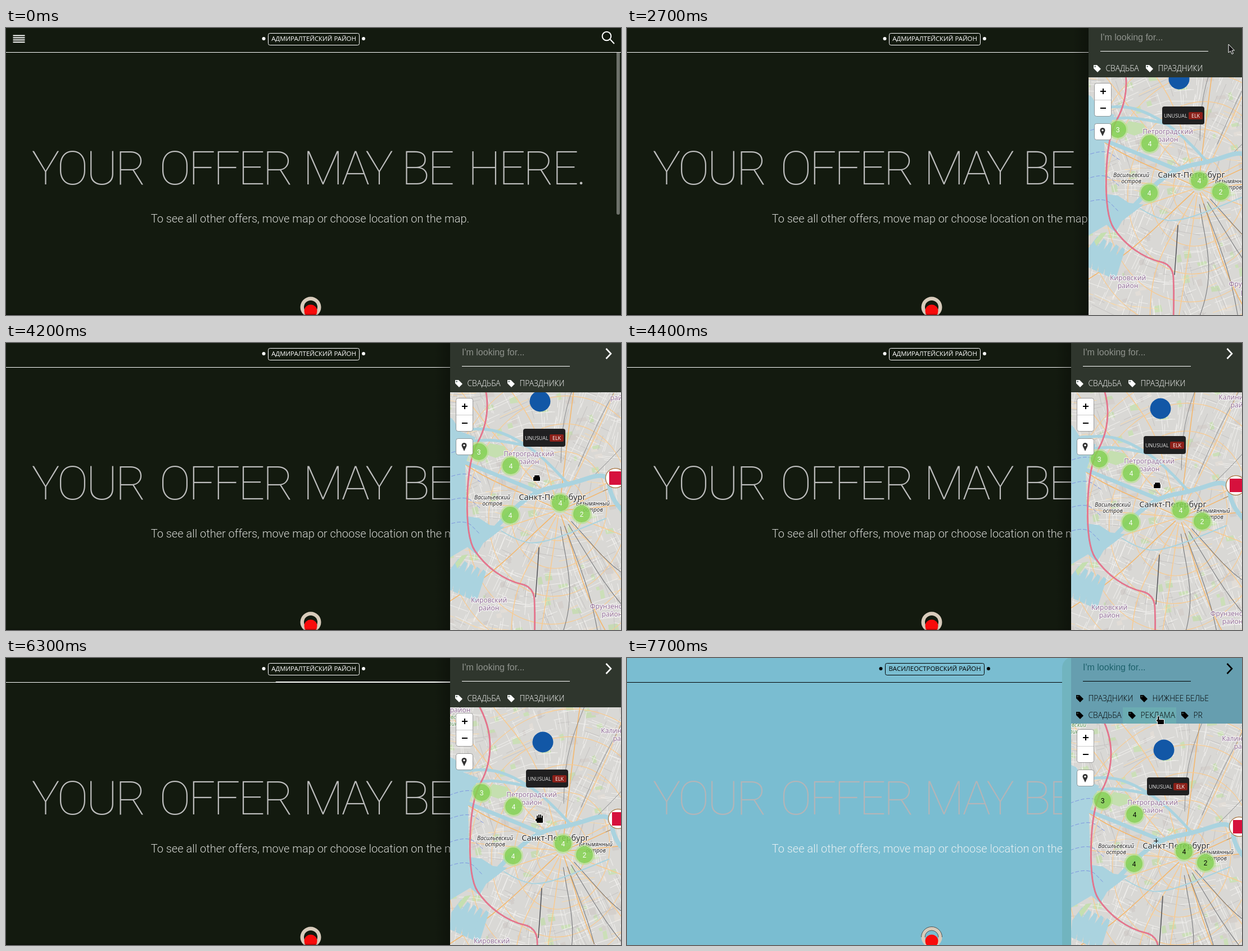
Write an HTML page with a canvas that moves like this. It is 1094x512 px and loops after 8 s.

```html
<!DOCTYPE html>
<html lang="en">
<head>
<meta charset="utf-8">
<title>Offer map</title>
<style>
html, body { margin: 0; width: 100%; height: 100%; overflow: hidden; background: #131a0f; }
canvas { display: block; width: 1094px; height: 512px; }
</style>
</head>
<body>
<canvas id="stage" width="1094" height="512"></canvas>
<script>
const LOOP = 8000, STEP = 100, W = 1094, H = 512;
const RELAYOUT = 6400;   // district name and tag rows change here
const g = document.getElementById('stage').getContext('2d');
const SANS = '"Open Sans", sans-serif', ARIAL = '"Liberation Sans", Arial, sans-serif';
const NOTO = '"Noto Sans", sans-serif', THIN = 'Roboto, sans-serif';

const clamp = v => Math.max(0, Math.min(1, v));
const progress = (t, from, to) => clamp((t - from) / (to - from));
const mix = (a, b, k) => `rgb(${a.map((v, i) => Math.round(v + (b[i] - v) * k))})`;

// Linear keyframes: each key is [time, x, y].
function track(keys, t) {
  const next = keys.findIndex(k => k[0] >= t);
  if (next === 0) return keys[0].slice(1);
  if (next < 0) return keys[keys.length - 1].slice(1);
  const a = keys[next - 1], b = keys[next], k = progress(t, a[0], b[0]);
  return [1, 2].map(i => a[i] + (b[i] - a[i]) * k);
}

function seeded(seed) {
  return () => (seed = (seed * 16807) % 2147483647) / 2147483647;
}

function text(c, str, x, y, font, color, align = 'left') {
  c.font = font;
  c.fillStyle = color;
  c.textAlign = align;
  c.fillText(str, x, y);
}

function disc(c, x, y, r, color) {
  c.fillStyle = color;
  c.beginPath();
  c.arc(x, y, r, 0, 7);
  c.fill();
}

function box(c, x, y, w, h, r, fill, stroke) {
  c.beginPath();
  c.roundRect(x, y, w, h, r);
  if (fill) { c.fillStyle = fill; c.fill(); }
  if (stroke) { c.strokeStyle = stroke; c.lineWidth = 1; c.stroke(); }
}

function curve(c, p) {
  c.beginPath();
  c.moveTo(p[0], p[1]);
  for (let i = 2; i < p.length - 2; i += 2)
    c.quadraticCurveTo(p[i], p[i + 1], (p[i] + p[i + 2]) / 2, (p[i + 1] + p[i + 3]) / 2);
  c.lineTo(p[p.length - 2], p[p.length - 1]);
}

function line(c, p, color, width, dash = []) {
  curve(c, p);
  c.strokeStyle = color;
  c.lineWidth = width;
  c.setLineDash(dash);
  c.stroke();
  c.setLineDash([]);
}

function area(c, p, color) {
  c.beginPath();
  for (let i = 0; i < p.length; i += 2) c.lineTo(p[i], p[i + 1]);
  c.closePath();
  c.fillStyle = color;
  c.fill();
}

// ---- city map, drawn once in stage coordinates ----
const MAP = { x: 770, y: 10, w: 350, h: 520 }, CENTER = { x: 985, y: 285 };

function drawLand(c, rnd) {
  const place = () => [MAP.x + rnd() * MAP.w, MAP.y + rnd() * MAP.h];
  c.fillStyle = '#d9d8d5';
  c.fillRect(MAP.x, MAP.y, MAP.w, MAP.h);
  const tints = ['#cbdfb8', '#d2cecb', '#e2ddd7', '#c8dbb5', '#d5d0cc'];
  for (let i = 0; i < 170; i++) {
    const [x, y] = place(), w = 3 + rnd() * 14, h = 3 + rnd() * 9;
    area(c, [x, y, x + w, y - 3, x + w + 3, y + h, x + 2, y + h + 2], tints[i % tints.length]);
  }
  // The street bearing drifts slowly across the city.
  for (let i = 0; i < 750; i++) {
    const [x, y] = place(), len = 5 + rnd() * 20;
    const a = 0.45 * Math.sin(x / 55 + y / 90) + (i % 2) * Math.PI / 2;
    const dx = Math.cos(a) * len, dy = Math.sin(a) * len;
    const color = i % 12 === 0 ? '#fbd7a3' : i % 5 ? '#f3f2f0' : '#c2c0bf';
    line(c, [x - dx, y - dy, x + dx, y + dy], color, 0.9);
  }
}

// A road leaving the centre at an angle, bending gently on its way out.
function radial(c, angle, from, to, bend, color, width) {
  const p = [];
  for (let r = from; r <= to; r += 40) {
    const a = angle + bend * Math.sin(r / 70);
    p.push(CENTER.x + r * Math.cos(a), CENTER.y + r * Math.sin(a));
  }
  line(c, p, color, width);
}

function drawRoads(c, rnd) {
  for (let i = 0; i < 16; i++)
    radial(c, i * Math.PI / 8 + rnd() * 0.15, 10, 330, rnd() * 0.3 - 0.15, i % 3 ? '#f8ca90' : '#f5b669', 1.5);
  for (let r = 55; r < 260; r += 50) {
    c.beginPath();
    c.ellipse(CENTER.x, CENTER.y, r * 0.8, r, 0.2, 0, 7);
    c.strokeStyle = '#f8ca90';
    c.lineWidth = 1.2;
    c.stroke();
  }
  for (let i = 0; i < 4; i++) {
    radial(c, 0.7 + i * 0.28, 30, 350, 0.12 - i * 0.08, '#77787b', 1.1);
    radial(c, -0.5 - i * 0.32, 85, 350, 0.1 - i * 0.06, '#87888a', 1);
  }
  line(c, [949, 352, 946, 400, 943, 440], '#55565a', 1.6);
}

function drawWater(c) {
  const water = '#aad3df';
  area(c, [770, 110, 795, 122, 810, 145, 836, 155, 818, 203, 820, 296, 842, 299, 862, 312,
    888, 315, 850, 344, 838, 365, 822, 351, 770, 382], water);
  for (let i = 0; i < 5; i++) {
    const x = 788 + i * 11, y = 395 + i * 5;
    area(c, [x, y, x + 18, y - 24, x + 23, y - 20, x + 6, y + 34, x - 3, y + 30], water);
  }
  const neva = [864, 326, 884, 301, 943, 250, 1005, 239, 1072, 216, 1076, 262, 1110, 300];
  const littleNeva = [946, 252, 895, 231, 815, 199];
  const nevka = [1000, 238, 982, 217, 934, 172, 868, 139, 810, 142];
  const middleNevka = [932, 172, 877, 159, 825, 162];
  const canal = [882, 322, 915, 343, 960, 344, 1068, 300];
  [[neva, 8], [littleNeva, 7], [nevka, 5], [middleNevka, 5], [canal, 2]]
    .forEach(([p, width]) => line(c, p, water, width));
  for (let i = 0; i < 4; i++) {
    const y = 180 + i * 42;
    line(c, [775, y + 10, 815, y - 8, 845, y + 8 + i * 5], '#7d94df', 1, [6, 4]);
  }
}

function drawLabels(c) {
  function label(str, x, y, font, color, gap = 0) {
    str.split(' ').forEach((row, i) => {
      c.font = font;
      c.textAlign = 'center';
      c.strokeStyle = 'rgba(255,255,255,.7)';
      c.lineWidth = 2.5;
      c.strokeText(row, x, y + i * gap);
      text(c, row, x, y + i * gap, font, color, 'center');
    });
  }
  const district = (name, x, y) => label(name + ' район', x, y, '12px ' + NOTO, '#94719a', 14);
  const island = (name, x, y) => label(name + ' остров', x, y, 'italic 10px ' + NOTO, '#222', 11);
  district('Петроградский', 931, 189);
  district('Кировский', 860, 450);
  district('Фрунзенский', 1079, 461);
  district('Калининский', 1094, 75);
  district('Приморский', 804, 24);
  island('Васильевский', 866, 266);
  island('Безымянный', 1045, 277);
  label('Невский лики', 794, 50, 'italic 10px ' + NOTO, '#5b9254', 12);
  label('Санкт-Петербург', 973, 267, '14.5px ' + NOTO, '#2b2b2b');
}

function drawMap() {
  const canvas = document.createElement('canvas');
  canvas.width = MAP.w;
  canvas.height = MAP.h;
  const c = canvas.getContext('2d'), rnd = seeded(4711);
  c.translate(-MAP.x, -MAP.y);
  c.lineJoin = c.lineCap = 'round';
  drawLand(c, rnd);
  drawRoads(c, rnd);
  drawWater(c);
  area(c, [846, 183, 862, 166, 888, 171, 893, 184, 872, 192], '#c5dfb0');
  area(c, [800, 380, 812, 366, 823, 364, 804, 389], '#c5dfb0');
  const motorway = [834, 20, 857, 60, 857, 134, 823, 195, 820, 335, 850, 380, 895, 412, 940, 422, 942, 470, 941, 520];
  line(c, motorway, '#dc5c79', 2.6);
  line(c, motorway, '#ea7d94', 1.4);
  drawLabels(c);
  return canvas;
}
const cityMap = drawMap();

// ---- panel ----
const clusters = [[842, 181, 3], [899, 206, 4], [898, 294, 4], [987, 272, 4], [1025, 292, 2]];
const dragOffset = t => track([[4000, 0, 0], [4400, -2, 26], [4800, 3, 51], [5000, 4, 59]], t).map(Math.round);

function drawMarkers(ink) {
  disc(g, 951, 91, 18.5, '#1257a6');
  box(g, 921, 140, 75, 32, 4, '#202021');
  box(g, 968, 150, 25, 13, 2, '#8b2019');
  text(g, 'UNUSUAL', 924, 160, '9px ' + SANS, '#e4e4e4');
  text(g, 'ELK', 980.5, 160, '9px ' + SANS, '#fff', 'center');
  disc(g, 1085, 228, 18, '#a5713c');
  disc(g, 1085, 228, 16.8, '#fff');
  g.fillStyle = '#d6113d';
  g.fillRect(1074, 216, 23, 24);
  for (const [x, y, n] of clusters) {
    disc(g, x, y, 18, 'rgba(181,226,140,.65)');
    disc(g, x, y, 15, 'rgba(110,204,57,.6)');
    text(g, n, x, y + 4.5, '12px ' + ARIAL, ink, 'center');
  }
}

function drawControls() {
  const edge = 'rgba(0,0,0,.35)';
  box(g, 800.5, 98.5, 30, 59, 4, '#fff', edge);
  box(g, 800.5, 170.5, 30, 29, 4, '#fff', edge);
  g.fillStyle = '#ccc';
  g.fillRect(801, 128, 29, 1);
  g.fillStyle = '#000';
  g.fillRect(811, 112, 10, 2);
  g.fillRect(815, 108, 2, 10);
  g.fillRect(811, 142, 10, 2);
  area(g, [811.2, 185, 818.8, 185, 815, 193], '#333');
  disc(g, 815, 182.5, 4.5, '#333');
  disc(g, 815, 182.5, 1.7, '#fff');
}

function drawTag(str, x, y, ink) {
  area(g, [x - 6, y - 6, x, y - 6, x + 7, y + 1, x + 1, y + 7, x - 6, y], ink);
  disc(g, x - 3.3, y - 3.3, 1.3, 'rgba(70,90,85,.9)');
  text(g, str, x + 15.5, y + 5, '300 13.8px ' + SANS, ink);
}

function drawPanelEdge(theme) {
  const shade = g.createLinearGradient(762, 0, 790, 0);
  shade.addColorStop(0, 'rgba(0,0,0,0)');
  shade.addColorStop(1, 'rgba(0,0,0,.25)');
  g.globalAlpha = 1 - theme;
  g.fillStyle = shade;
  g.fillRect(762, 0, 28, H);
  g.globalAlpha = theme;
  box(g, 774, -2, 60, H + 40, 20, '#71b4bf');
  g.globalAlpha = 1;
}

function drawPanel(t, theme, ink) {
  const wide = t >= RELAYOUT, top = wide ? 117 : 88;
  const [mapX, mapY] = dragOffset(t);
  g.save();
  g.translate(Math.round(31 * (1 - progress(t, 2700, 2850))), 0);
  drawPanelEdge(theme);
  g.fillStyle = mix([47, 54, 45], [102, 158, 175], theme);
  g.fillRect(790, 0, 304, top);
  text(g, "I'm looking for...", 811, 22, '16px ' + ARIAL, mix([142, 146, 140], [30, 98, 108], theme));
  g.fillStyle = ink;
  g.fillRect(811, 41, 192, 1);
  g.strokeStyle = ink;
  g.lineWidth = 2.6;
  g.beginPath();
  g.moveTo(1067.5, 10);
  g.lineTo(1076, 19);
  g.lineTo(1067.5, 28);
  g.stroke();
  if (wide) {
    if (t >= 7500) {
      g.fillStyle = '#6bacb2';
      g.fillRect(882, 88, 95, 29);
    }
    drawTag('ПРАЗДНИКИ', 805, 72, ink);
    drawTag('НИЖНЕЕ БЕЛЬЕ', 919, 72, ink);
    drawTag('СВАДЬБА', 805, 102, ink);
    drawTag('РЕКЛАМА', 898, 102, ink);
    drawTag('PR', 992, 102, ink);
  } else {
    drawTag('СВАДЬБА', 805, 72, ink);
    drawTag('ПРАЗДНИКИ', 898, 72, ink);
  }

  g.beginPath();
  g.rect(790, top, 304, H - top);
  g.clip();
  g.save();
  g.translate(mapX, mapY + (wide ? 14 : 0));
  g.drawImage(cityMap, MAP.x, MAP.y);
  drawMarkers(ink);
  if (wide) {
    g.fillStyle = '#000';
    g.fillRect(933, 253, 8, 1);
    g.fillRect(937, 249, 1, 8);
  }
  g.restore();
  g.translate(0, wide ? 29 : 0);
  drawControls();
  g.restore();
}

// ---- cursor ----
function handParts(kind) {
  if (kind === 'closed') return [[-6, -2, 12, 7], [-4, -5, 9, 5]];
  if (kind === 'point') return [[-5, -8, 2.5, 11], [-5, -2, 11, 8], [-7, -2, 4, 3]];
  const fingers = [6, 8, 8, 6].map((len, i) => [-5 + i * 3, -len, 2, len + 1]);
  return [...fingers, [-5, -2, 11, 9], [-7, 0, 3, 4]];
}

function handKind(t) {
  if (t >= 7500 || (t >= 3400 && t < 3500)) return 'point';
  return t >= 4100 && t < 5300 ? 'closed' : 'open';
}

function cursorPosition(t) {
  if (t < 4000)
    return track([[100, 881, -4], [900, 1029, 32], [1400, 1070, 29], [2700, 1070, 29],
      [3400, 995, 148], [3900, 945, 228]], t);
  const [dx, dy] = dragOffset(t), k = progress(t, 6800, 7700);
  return [945 + dx + 33 * Math.sin(Math.PI * k), 228 + dy - 175 * k * k * (3 - 2 * k)];
}

function drawCursor(t) {
  if (t < 100) return;
  g.save();
  g.translate(...cursorPosition(t).map(Math.round));
  if (t < 3200) {
    area(g, [0, 0, 0, 15, 3.5, 12, 6, 17.5, 8.5, 16.5, 6, 11, 10.5, 11], '#111');
    g.strokeStyle = '#fff';
    g.lineWidth = 1;
    g.stroke();
  } else {
    const parts = handParts(handKind(t));
    for (const [x, y, w, h] of parts) box(g, x - 1, y - 1, w + 2, h + 2, 2, '#fff');
    for (const [x, y, w, h] of parts) box(g, x, y, w, h, 1, '#000');
  }
  g.restore();
}

// ---- page ----
function drawHeader(t, ink) {
  const late = t >= RELAYOUT, w = late ? 176 : 162, x = 547 - w / 2;
  box(g, x + .5, 9.5, w, 21, 3, null, ink);
  text(g, late ? 'ВАСИЛЕОСТРОВСКИЙ РАЙОН' : 'АДМИРАЛТЕЙСКИЙ РАЙОН', 547.5, 23, '11.4px ' + SANS, ink, 'center');
  disc(g, x - 7.5, 19, 3, ink);
  disc(g, x + w + 8, 19, 3, ink);
  g.fillStyle = ink;
  g.fillRect(0, 43, W, 1);
  // Loading bar: the head runs ahead, the tail follows.
  const head = W * progress(t, 5900, 6200), tail = W * progress(t, 6100, 6556);
  g.fillRect(tail, 42, head - tail, 2);
  if (t < 2700) {
    for (let i = 0; i < 4; i++) g.fillRect(12.5, 12.5 + i * 3.9, 21, 2);
    g.strokeStyle = ink;
    g.lineWidth = 2;
    g.beginPath();
    g.arc(1068.5, 14.5, 7.8, 0, 7);
    g.moveTo(1075, 20.5);
    g.lineTo(1082, 28);
    g.stroke();
    box(g, 1086, 44, 6, 289, [0, 0, 3, 3], '#6d716a');
  }
}

function drawOffer(back, theme) {
  const words = { 'YOUR': 147.5, 'OFFER': 392, 'MAY': 608.5, 'BE': 750.5, 'HERE.': 927 };
  g.letterSpacing = '-4px';
  for (const word in words)
    text(g, word, words[word] - 2, 279, '100 84px ' + THIN, mix([190, 190, 190], [180, 181, 184], theme), 'center');
  g.letterSpacing = '0px';
  text(g, 'To see all other offers, move map or choose location on the map.', 541, 347,
    '300 20px ' + THIN, mix([212, 214, 210], [232, 240, 243], theme), 'center');

  disc(g, 542, 498, 18.5, '#d8cbbb');
  disc(g, 542, 498, 12, back);
  g.strokeStyle = `rgba(40,40,40,${theme * .7})`;
  g.lineWidth = 1;
  for (const r of [18.5, 12]) {
    g.beginPath();
    g.arc(542, 498, r, Math.PI, 2 * Math.PI);
    g.stroke();
  }
  disc(g, 542, 505, 11.5, '#f80b0b');
}

function draw(t) {
  const theme = progress(t, 6300, 6600);
  const ink = mix([255, 255, 255], [0, 0, 0], theme);
  const back = mix([19, 26, 15], [122, 189, 209], theme);
  g.fillStyle = back;
  g.fillRect(0, 0, W, H);
  drawOffer(back, theme);
  g.fillStyle = `rgba(0,0,0,${.3 * (1 - theme)})`;
  g.fillRect(0, 510, W, 2);
  drawHeader(t, ink);
  if (t >= 2700) drawPanel(t, theme, ink);
  drawCursor(t);
}

const start = performance.now();
function tick() {
  const t = (performance.now() - start) % LOOP;
  draw(Math.floor(t / STEP) * STEP);
  requestAnimationFrame(tick);
}
tick();
</script>
</body>
</html>
```
